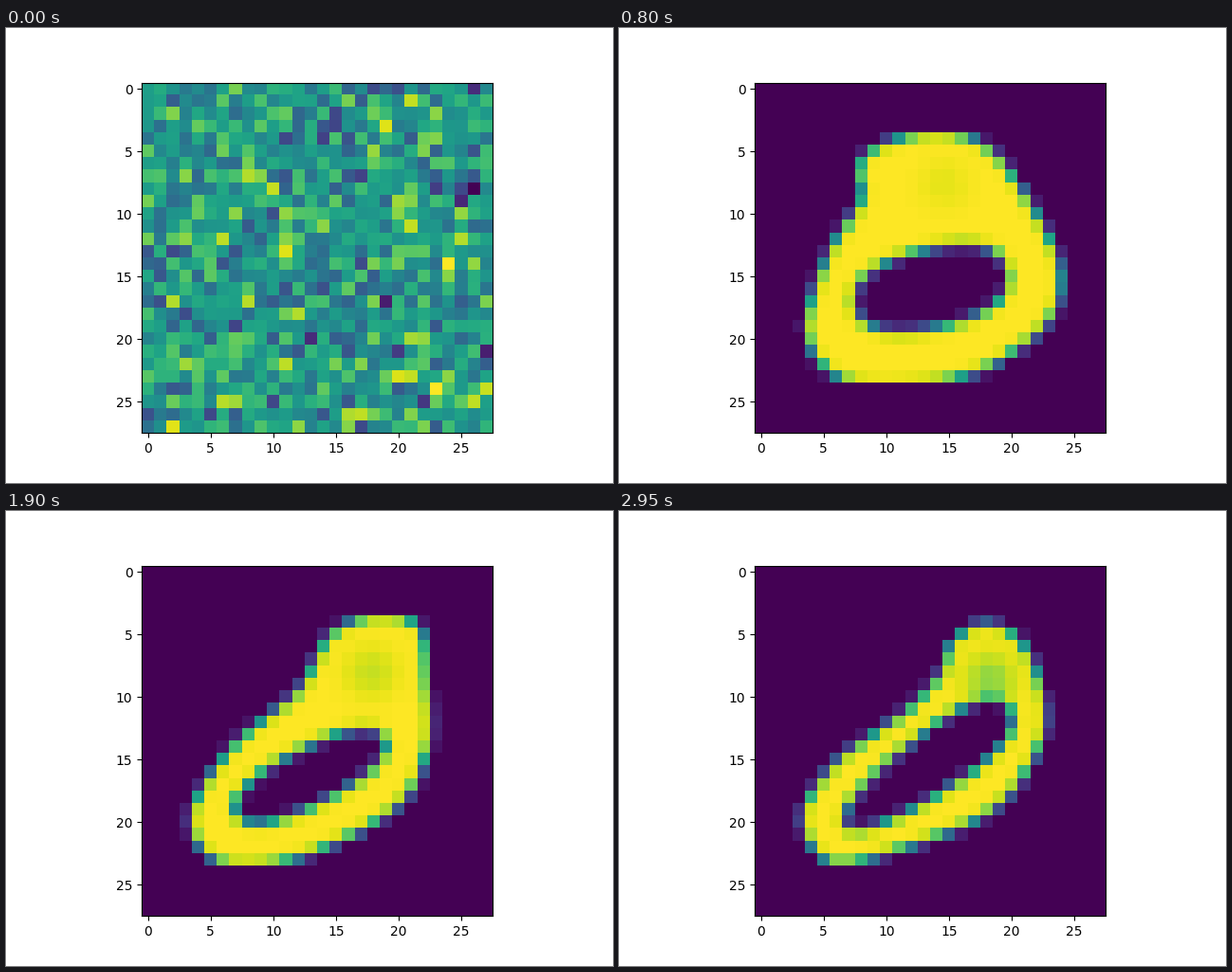
Write a matplotlib script that moves like this. It is 640 px wide and 480 px high and loops after 3 s.

```python
import numpy as np
import matplotlib.pyplot as plt
from matplotlib.animation import FuncAnimation
from matplotlib.path import Path

N = 28
FRAMES, STEP = 60, 50
LOOP = FRAMES * STEP

rows, cols = np.mgrid[0:N, 0:N]
CELLS = np.column_stack([cols.ravel(), rows.ravel()]).astype(float)

# Key poses: time in ms, a few outline points clockwise from the top left,
# and the hole as an egg: centre x, y, half length, half width, tilt, taper
POSES = [
    (400,
     [(8.3, 4.1), (13, 3.5), (17.5, 5.1), (22, 9.1), (24.7, 14.5), (23.8, 19.5),
      (18.5, 23.1), (8.3, 23.5), (4.4, 20), (5.6, 13.5), (6.5, 9), (5.3, 6.2)],
     (14.9, 16, 5.9, 3.1, .17, .15)),
    (1150,
     [(10, 4.6), (14.5, 3.4), (18.5, 4.8), (21.3, 9.1), (23.7, 14.5), (22.2, 19),
      (15.5, 23), (7, 23.5), (3.4, 19.5), (5.3, 13.2), (8.3, 9), (8.5, 6.2)],
     (13.2, 16, 6.3, 3.1, .25, 0)),
    (2250,
     [(15.2, 5), (18.5, 3.5), (22, 4.4), (22.4, 9), (22.2, 14), (19.4, 19),
      (11.5, 22.9), (5.6, 23.2), (3.4, 19.5), (7, 14), (12, 10), (13.9, 7.2)],
     (12.95, 16.4, 6.6, 2.1, .5, 0)),
    (2950,
     [(15.2, 5.8), (17.5, 4.2), (20.4, 5.2), (22.3, 9), (22.4, 13.5), (18.6, 19),
      (10.8, 22.3), (5.5, 23.2), (3.3, 19.5), (6.2, 15.1), (11.5, 11.2), (14.3, 8.2)],
     (13.3, 15.6, 8, 2.3, .62, .2)),
]


def ease(u):
    """Ease out between poses, slow drift before the first one."""
    return u * (2 - u) if u > 0 else u / 2


def pose_at(time):
    for (t0, *a), (t1, *b) in zip(POSES, POSES[1:]):
        if time <= t1:
            break
    u = ease((time - t0) / (t1 - t0))
    return [np.array(p) * (1 - u) + np.array(q) * u for p, q in zip(a, b)]


def spline(p, steps=8):
    """Closed Catmull-Rom curve through the points."""
    u = (np.arange(steps) / steps)[None, :, None]
    a, b, c, d = (np.roll(p, k, axis=0)[:, None] for k in (1, 0, -1, -2))
    curve = b + .5 * u * (c - a + u * (2 * a - 5 * b + 4 * c - d
                                       + u * (3 * (b - c) + d - a)))
    return curve.reshape(-1, 2)


def egg(x, y, length, width, tilt, taper):
    """Tilted, slightly squared ellipse that widens towards the right."""
    angle = np.linspace(0, 2 * np.pi, 64, endpoint=False)
    c, s = (np.sign(v) * abs(v) ** .85 for v in (np.cos(angle), np.sin(angle)))
    along, across = length * c, width * s * (1 + taper * c)
    return np.column_stack([x + along * np.cos(tilt) + across * np.sin(tilt),
                            y - along * np.sin(tilt) + across * np.cos(tilt)])


def depth(a):
    """Signed distance of every cell to a closed curve, positive inside."""
    ab = np.roll(a, -1, axis=0) - a
    ap = CELLS[:, None] - a[None]
    h = np.clip((ap * ab).sum(2) / (ab ** 2).sum(1), 0, 1)
    dist = np.linalg.norm(ap - h[..., None] * ab, axis=2).min(1)
    inside = Path(np.vstack([a, a[:1]])).contains_points(CELLS)
    return np.where(inside, dist, -dist).reshape(N, N)


def digit(time):
    outline, hole = pose_at(time)
    d = np.minimum(depth(spline(outline)), -depth(egg(*hole)))
    img = 1 / (1 + np.exp(-4.8 * d))
    # Faint dip in the upper body, stronger as the stroke thins
    x, y = (outline[3] + outline[-1]) / 2
    dip = .03 + .15 * (time / LOOP) ** 2
    img *= 1 - dip * np.exp(-((cols - x) ** 2 + (rows - y) ** 2) / 4)
    # The glyph sits in a box with four empty rows above and below
    img[(img < .04) | (abs(rows - 13.5) > 10)] = 0
    return img


def noise():
    img = np.random.default_rng(7).standard_normal((N, N))
    return (img - img.min()) / np.ptp(img)


fig, ax = plt.subplots(figsize=(6.4, 4.8), dpi=100)
image = ax.imshow(noise(), cmap="viridis", vmin=0, vmax=1)


def draw(i):
    image.set_data(digit(i * STEP) if i else noise())
    return [image]


anim = FuncAnimation(fig, draw, frames=FRAMES, interval=STEP,
                     repeat=True, repeat_delay=0)
plt.show()
```
